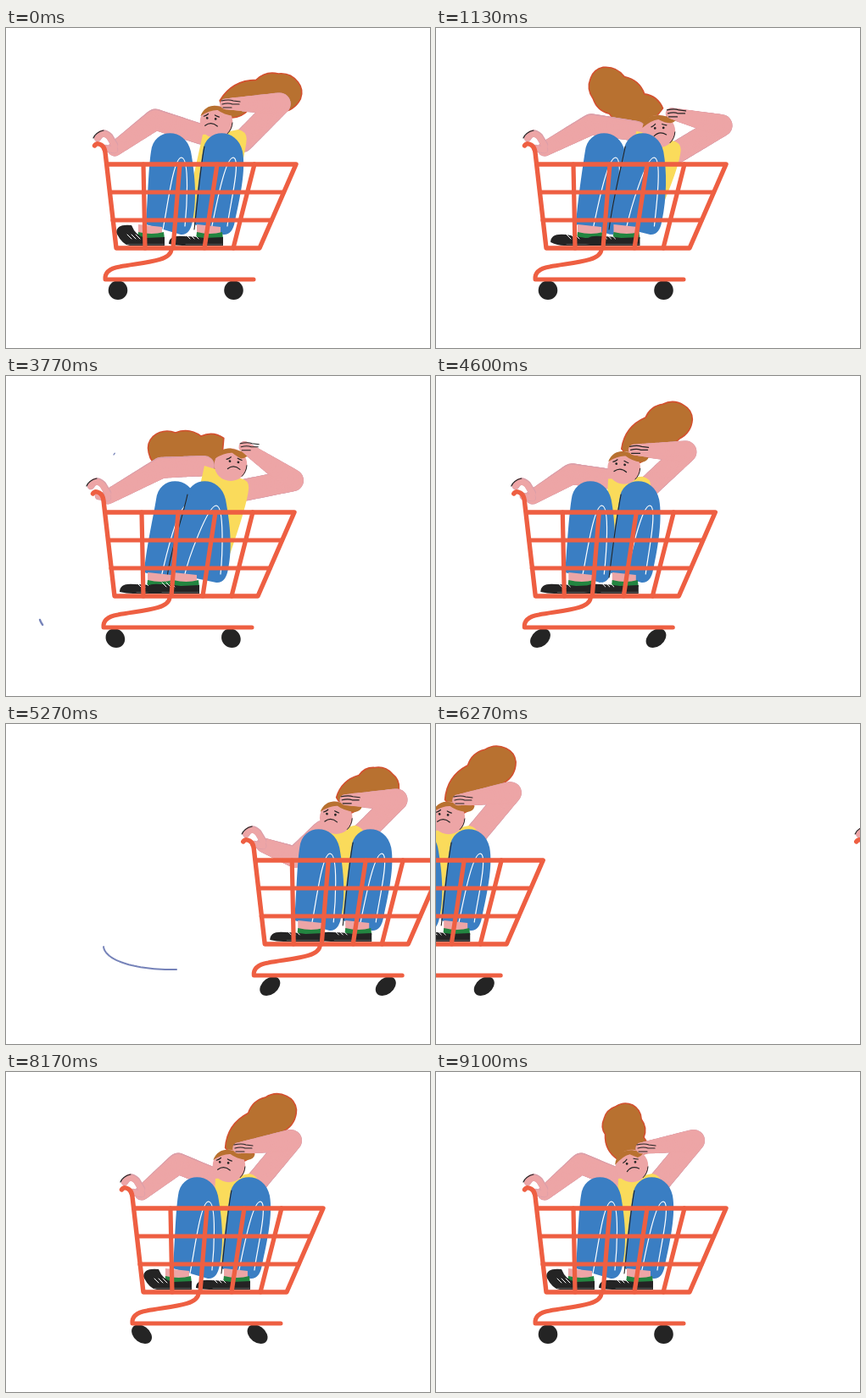
Recreate the animation shown at these times as an HTML page with a canvas. Size 500 px wide and 378 px high, loop 9130 ms.

```html
<!DOCTYPE html>
<html lang="en">
<head>
<meta charset="utf-8">
<title>Trolley ride</title>
<style>
html, body { margin: 0; width: 100%; height: 100%; overflow: hidden; background: #fff; }
canvas { display: block; }
</style>
</head>
<body>
<canvas id="stage" width="500" height="378"></canvas>
<script>
const g = document.getElementById('stage').getContext('2d');
const LOOP = 9130, WRAP = 607;
const RED = '#ee5f42', SKIN = '#eda5a6', SHADE = '#dc9fa9', BLUE = '#3a7ec3', YELLOW = '#fadb5b',
  HAIR = '#b87130', EDGE = '#d3502f', INK = '#242424', GREEN = '#238540', TRAIL = '#7683b9';

// The rider blends between these two poses.
const SIT = { head: [231, 111], left: [215, 126], right: [265, 125], elbowL: [171, 108], elbowR: [304, 81] };
const LEAN = { head: [279, 132], left: [243, 118], right: [296, 150], elbowL: [190, 119], elbowR: [352, 140] };
// Cart position: time, x
const ROLL = [[0, 0], [3300, 0], [3770, -2], [4560, -14], [5270, 175], [6270, 391], [7230, 620],
  [7850, 654], [8700, WRAP], [LOOP, WRAP]];

const clamp = v => Math.max(0, Math.min(1, v));
const mix = (a, b, u) => a + (b - a) * u;
const ease = (a, b, t) => {
  const u = clamp((t - a) / (b - a));
  return u * u * (3 - 2 * u);
};
const bump = (mid, width, t) => Math.exp(-(((t - mid) / width) ** 2));
const cubic = (a, b, c, d, u) => {
  const w = 1 - u;
  return [0, 1].map(k => a[k] * w ** 3 + 3 * b[k] * w * w * u + 3 * c[k] * w * u * u + d[k] * u ** 3);
};

// Flat at turning points, smooth elsewhere.
function slope(i) {
  const p = ROLL[i - 1], q = ROLL[i], r = ROLL[i + 1];
  if (!p || !r || (q[1] - p[1]) * (r[1] - q[1]) <= 0) return 0;
  return (r[1] - p[1]) / (r[0] - p[0]);
}
function roll(t) {
  let i = 0;
  while (i < ROLL.length - 2 && t >= ROLL[i + 1][0]) i++;
  const [t0, x0] = ROLL[i], [t1, x1] = ROLL[i + 1], d = t1 - t0, u = clamp((t - t0) / d), w = 1 - u;
  return x0 * w * w * (1 + 2 * u) + slope(i) * d * u * w * w +
    x1 * u * u * (3 - 2 * u) - slope(i + 1) * d * u * u * w;
}

function fill(d, color) { g.fillStyle = color; g.fill(new Path2D(d)); }
function line(d, color, width) {
  g.strokeStyle = color;
  g.lineWidth = width;
  g.stroke(new Path2D(d));
}
function disc(x, y, r, color) {
  g.fillStyle = color;
  g.beginPath();
  g.arc(x, y, r, 0, 7);
  g.fill();
}
function at(x, y, deg, draw) {
  g.save();
  g.translate(x, y);
  g.rotate(deg * Math.PI / 180);
  draw();
  g.restore();
}

function limb(s, e, h, radii, color, from = 0) {
  const spot = u => [0, 1].map(k => u < .5 ? mix(s[k], e[k], 2 * u) : mix(e[k], h[k], 2 * u - 1));
  const [r0, r1, r2] = radii, n = 48;
  g.strokeStyle = color;
  for (let i = from * n; i < n; i++) {
    const u = i / n;
    g.lineWidth = 2 * (u < .5 ? mix(r0, r1, 2 * u) : mix(r1, r2, 2 * u - 1));
    g.beginPath();
    g.moveTo(...spot(u));
    g.lineTo(...spot(u + 1 / n));
    g.stroke();
  }
}

function trail(t, start, end, span, width, p) {
  const q = (t - start) / (end - start) * (1 + span), a = clamp(q - span), b = clamp(q);
  if (q <= 0 || a >= 1) return;
  g.strokeStyle = TRAIL;
  g.lineWidth = width;
  g.beginPath();
  for (let i = 0; i <= 30; i++) g.lineTo(...cubic(...p, mix(a, b, i / 30)));
  g.stroke();
}

function hair(x, y, deg, len) {
  const side = Math.cos(deg * Math.PI / 180), under = .4 - .3 * Math.max(0, side);
  const pts = [[0, -.3], [.5, -.46], [.78, -.42], [.97, -.08], [.93, .3], [.64, .43], [.3, under], [0, under]]
    .map(([u, v]) => [u * len, v * 51]);
  at(x + 10 * side, y - 11, deg, () => {
    g.beginPath();
    g.moveTo(...pts[0]);
    for (let i = 1; i < pts.length; i++) {
      const p = pts[i - 1], q = pts[i], dx = q[0] - p[0], dy = q[1] - p[1];
      g.quadraticCurveTo((p[0] + q[0]) / 2 + dy * .28, (p[1] + q[1]) / 2 - dx * .28, ...q);
    }
    g.closePath();
    g.fillStyle = HAIR;
    g.strokeStyle = EDGE;
    g.lineWidth = 1.6;
    g.fill();
    g.stroke();
  });
}

function face(x, y, tilt, shift, fringe) {
  disc(x, y, 19.3, SKIN);
  at(x, y, tilt, () => {
    const tip = 18 + 12 * fringe;
    fill(`M-19-6C-15-18-5-21 5-18Q${tip - 8}-15 ${tip}-16Q${tip - 1}-9 ${tip - 9}-8Q8-9 1-14Q-8-14-19-6Z`, HAIR);
    g.translate(shift, 0);
    disc(-5, -4, 1.4, INK);
    disc(5, -3.5, 1.4, INK);
    line('M-9-6Q-6-7-4-9M4-8Q6-7 9-6M-7 5Q0-1 7.500 5', INK, 1.2);
  });
  g.strokeStyle = INK;
  g.lineWidth = 1;
  g.beginPath();
  g.arc(x, y, 19, .05, .8);
  g.stroke();
}

function shoe(heel, lift) {
  const toe = -64 + 7 * lift, low = -13 * lift;
  at(heel, 257, 0, () => {
    fill('M-31-25L-3-22V-14H-31Z', SKIN);
    fill('M-31-16Q-15-12-1-16L0-8L-32-8Z', GREEN);
    fill(`M0 0V-10L-22-9Q-34-11 ${toe + 18} ${low - 11}Q${toe} ${low - 13} ${toe} ${low - 2}
      Q${toe + 8} 0 ${toe + 16} 0Z`, INK);
    line('M-34-13L-29-8M-39-13L-34-8M-44-13L-39-8', '#fff', 1);
    line('M-44-1.500L-1-1.500', '#777', .6);
  });
}

function leg(knee, base, back) {
  fill(`M${base} 232C${base + 2} 205 ${knee - 26} 165 ${knee - 23} 146C${knee - 20} 117 ${knee + 18} 117 ${knee + 24} 146
    C${knee + 28} 168 ${back + 6} 200 ${back} 228Q${back - 3} 245 ${back - 14} 244Z`, BLUE);
  line(`M${base + 20} 238C${base + 25} 215 ${knee + 3} 153 ${knee + 13} 153
    C${knee + 23} 154 ${back - 7} 215 ${back - 9} 234`, '#fff', 1.2);
}

function rider(t) {
  const lean = ease(0, 2200, t) - .25 * ease(2500, 3770, t) - .75 * ease(3770, 4900, t);
  const fold = ease(0, 2000, t) - ease(3770, 4900, t);
  const sway = 17 * (1 - ease(0, 2000, t)) - 17 * bump(5270, 500, t);
  const lift = 20 * bump(3770, 700, t), turn = ease(8400, LOOP, t);
  const joint = (name, follow, rise, drop = 0) => [
    mix(SIT[name][0], LEAN[name][0], lean) + sway * follow,
    mix(SIT[name][1], LEAN[name][1], lean) - lift * rise + drop];

  const [x, y] = joint('head', 1, 1.1), [lx, ly] = joint('left', 1, .7), [rx, ry] = joint('right', 1.1, .9);
  const elbow = joint('elbowR', 1.1, .1, Math.abs(sway) * .5);
  const bend = joint('elbowL', .3, .4, Math.max(0, -sway) * 2.9);
  const shoulder = [rx - 5, ry + 9], hand = [x + 11 + 7 * lean, y - 21];
  const grip = -.3 * lift;

  const swing = -20 - 122 * ease(0, 1000, t) - 33 * ease(2400, 3770, t) + 143 * ease(4000, 4720, t) -
    15 * ease(5270, 6200, t) - 55 * turn;
  hair(x, y, swing, 97 - 10 * lean - 24 * bump(5270, 500, t) - 34 * ease(8750, LOOP, t));
  limb(shoulder, elbow, hand, [13, 13, 6.5], SHADE);
  limb(shoulder, elbow, hand, [12, 12.5, 6], SKIN);
  limb([lx, ly], bend, [128 + grip, 143], [12, 12.5, 8.5], SHADE);
  limb([lx, ly], [bend[0], bend[1] + .7], [128 + grip, 143], [11, 11.5, 8], SKIN);
  at(grip, 0, 0, () => {
    line('M108 130Q114 120 122 128L128 138M117 142L128 144', SHADE, 8.5);
    line('M108 130Q114 121 122 129L128 139M117 142L128 144', SKIN, 7);
    line('M103 130Q106 123 115 121', INK, 1.2);
  });

  fill(`M${lx} ${ly}Q${(lx + rx) / 2} ${(ly + ry) / 2 - 2} ${rx - 10} ${ry - 5}Q${rx} ${ry - 3} ${rx} ${ry + 6}
    Q${rx - 1} ${ry + 25} 262 222L210 225Z`, YELLOW);
  face(x, y, 3 - 18 * lean + .7 * lift - 17 * turn, -6 + 13 * lean + 6 * turn, 1 - Math.max(lean, turn));
  limb(shoulder, elbow, hand, [12, 12.5, 6], SKIN, .75);
  at(...hand, 0, () => line('M-5-4Q4-6 9-4L17-3M-4 0Q3-2 8 0L16 0M-3 4L7 4', INK, 1.2));

  const toe = 1 - ease(0, 1500, t) + ease(5600, 6600, t);
  const knee = 255 - 18 * fold, base = 222 - 30 * fold;
  leg(194 + 8 * fold, 165, 220);
  leg(knee, base, 270 - 6 * fold);
  line(`M${base} 238C${base + 4} 205 ${knee - 26} 165 ${knee - 21} 140`, INK, 1.1);
  shoe(200 - 13 * toe, toe);
  shoe(256 - 26 * fold, 0);
}

function cart(lean) {
  for (const x of [132, 268.5]) {
    g.save();
    g.translate(x, 321);
    g.transform(1, 0, -lean, 1, 0, 0);
    disc(0, -11.3, 11.3, INK);
    g.restore();
  }
  line('M104.500 139Q107 135 112 138Q116 140 117 147L130 260H299L342 161H119', RED, 5.4);
  line('M123 194H327M126 227H313M162 161L164 260M205 161L197 260M249 161L234 260M293 161L268 260', RED, 5.2);
  line('M195 262C194 276 160 277 134 282Q116 285 117 297H292', RED, 5);
}

function frame(now) {
  const t = now % LOOP, x = roll(t), speed = (roll(t + 8) - roll(t - 8)) / 16;
  g.fillStyle = '#fff';
  g.fillRect(0, 0, 500, 378);
  g.lineCap = g.lineJoin = 'round';
  trail(t, 2300, 3790, .4, 1.3, [[276, 49], [200, 46], [150, 60], [127, 93]]);
  trail(t, 2290, 3810, .4, 2.4, [[353, 233], [345, 330], [60, 345], [40, 288]]);
  trail(t, 4900, 5640, 1, 2, [[115, 263], [117, 280], [155, 291], [201, 290]]);
  trail(t, 6850, 7610, 1, 1.7, [[47, 66], [34, 78], [60, 92], [102, 93]]);
  for (const shift of [x, x - WRAP]) {
    g.save();
    g.translate(shift, 0);
    rider(t);
    cart(.36 * Math.tanh(speed * 25));
    g.restore();
  }
  requestAnimationFrame(frame);
}
requestAnimationFrame(frame);
</script>
</body>
</html>
```
